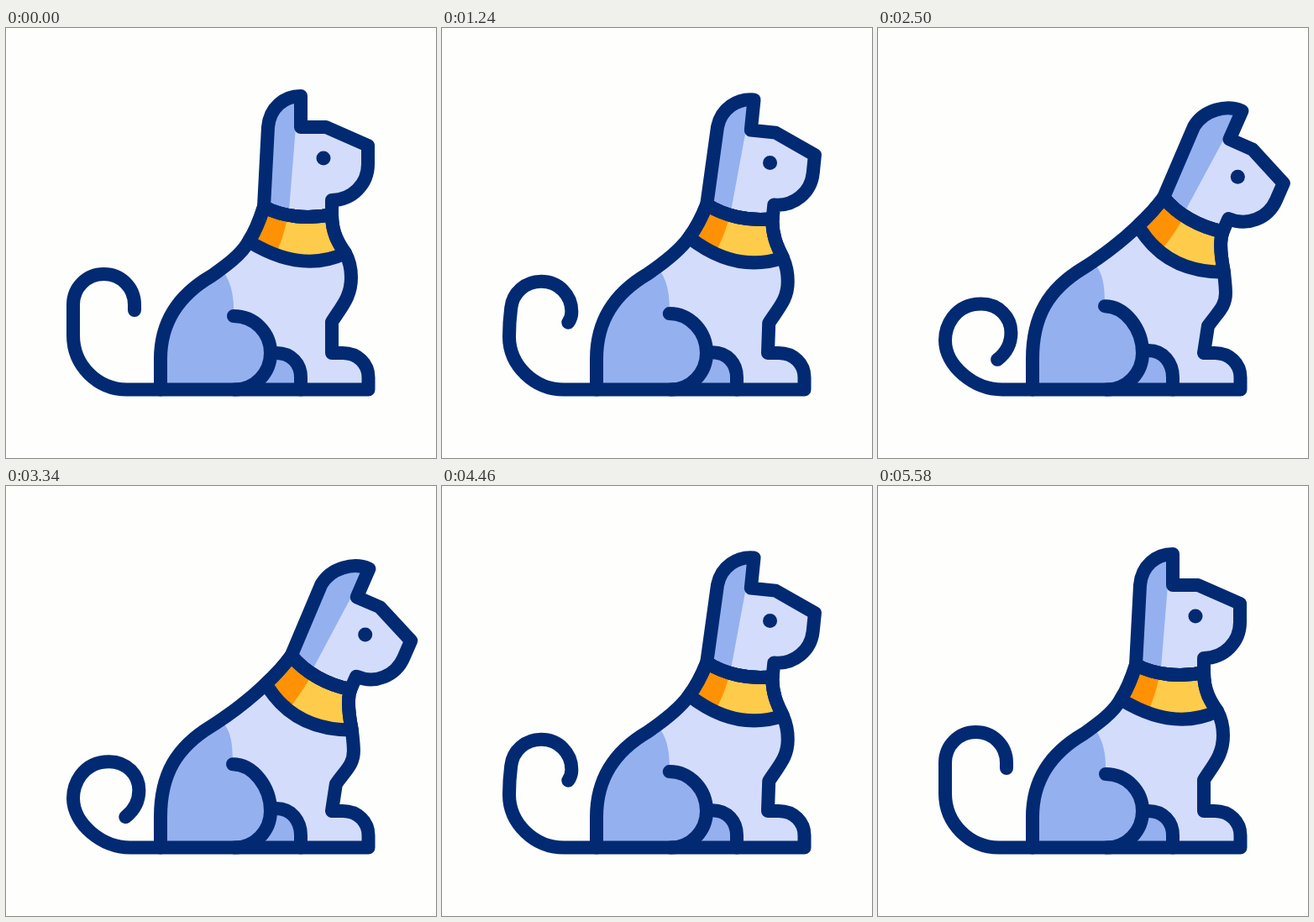
Animation of 512 by 512 pixels, one loop 5680 ms. Source, as an HTML page:

```html
<!DOCTYPE html>
<html lang="en">
<head>
<meta charset="utf-8">
<title>Sitting cat</title>
<style>
  html, body { margin: 0; width: 100%; height: 100%; overflow: hidden; background: #fefefc; }
  svg { display: block; width: 100%; height: 100%; }
  path { fill: none; stroke-width: 16; stroke-linecap: round; stroke-linejoin: round; }
</style>
</head>
<body>
<svg id="stage" viewBox="0 0 512 512"></svg>
<script>
const NAVY = '#022a72', LILAC = '#d3dcfb', BLUE = '#94b0ef', YELLOW = '#ffcb4a', ORANGE = '#ff9204';
const LOOP = 5680, TILT = 24 * Math.PI / 180;
const stage = document.getElementById('stage');

// Rigid head tilt: turns about the base of the ear and shifts it.
function tilt(path) {
  const c = Math.cos(TILT), s = Math.sin(TILT);
  return path.replace(/([\d.]+) ([\d.]+)/g, (_, px, py) => {
    const x = px - 351, y = py - 118;
    return (419.3 + x * c - y * s).toFixed(2) + ' ' + (132.7 + x * s + y * c).toFixed(2);
  });
}

// Each shape is a pair of poses: upright and leaning forward.
const back = [
  'M184 430.5 L184 394 C184 349 207 317 245 295',
  'M184 430.5 L184 394 C184 343 203 311 244 286'
];
const neck = [
  'C297 242 302 229 307 213',
  'C322 224 332 213 340.5 201.6'
];
const band = [
  'C330 225 360 228 388 222 C388 244 396 257 404 268',
  'C356.5 222 382.5 236.8 410.8 242.7 C407 252 408 270 412 291'
];
const body = [
  back[0] + ' C262 283 280 270 289 254 ' + neck[0] + band[0] +
  ' C409 277 411 288 411 297 C411 320 400 331 388 350 L388 387 L401 387 C419 387 431.5 400 431.5 416 L431.5 430.5 Z',
  back[1] + ' C268 271 291 253 310 235 ' + neck[1] + band[1] +
  ' C413 300 414 308 414 316 C414 332 405 338 393 355 L388 387 L401 387 C419 387 431.5 400 431.5 416 L431.5 430.5 Z'
];
const thigh = [
  'M271 343 C296 343 315 363 315 387 C315 411 296 430.5 272 430.5',
  'M270 331 C294 331 315 358 315 387 C315 411 296 430.5 272 430.5'
];
const haunch = [
  back[0] + ' L257 288 C268 301 272 320 ' + thigh[0].slice(1) + ' Z',
  back[1] + ' L256 279 C268 291 270 305 ' + thigh[1].slice(1) + ' Z'
];
const foot = [
  'M322 387 C340 387 351 400 351 416 L351 430.5 L300 430.5 L315 387 Z',
  'M322 384 C340 384 351 399 351 416 L351 430.5 L300 430.5 L315 387 Z'
];
const footLine = foot.map(d => d.split(' L300')[0]);
const collar = [
  'M289 254 ' + neck[0] + band[0] + ' Q352 293 289 254 Z',
  'M310 235 ' + neck[1] + band[1] + ' Q342 291 310 235 Z'
];
const clasp = [
  'M289 254 ' + neck[0] + ' L335 224 Q332 246 320 272 Z',
  'M310 235 ' + neck[1] + ' L364 226 Q354 244 335 268 Z'
];
const tail = [
  'M184 430.5 L144 430.5 C109 430.5 80 402 80 366 C80 354 80 342 80 329.5 C80 309 96 293 116.5 293 ' +
  'C137 293 153 309 153 329.5 C153 332 153 334 153 336',
  'M184 430.5 L148 430.5 C114 430.5 80 402 80 372 C80 362 83 353 89 345 C97 334.5 109 329 123 329 ' +
  'C144 329 158.5 345 158.5 363 C158.5 377 153 387 142 395.5'
];
// The back of the ear bends a little as the head tilts.
const headAt = ear => 'M307 213 L' + ear + ' 331 81 351 81 L351 118 L381 118 L431 140 L431 162 ' +
  'C431 186 412 205 388 205 L388 222 C360 228 330 225 307 213 Z';
const shadeAt = ear => 'M307 213 L' + ear + ' 331 81 351 81 L345 118 L336.5 223 Z';
const posed = shape => [shape('312 118 C314 95'), tilt(shape('306 121 C309 98'))];
const head = posed(headAt);
const headShade = posed(shadeAt);
const eye = ['M378 155 L378 155', tilt('M378 155 L378 155')];

const parts = [];
function add([from, to], fill, stroke, width) {
  const el = document.createElementNS('http://www.w3.org/2000/svg', 'path');
  if (fill) el.style.fill = fill;
  if (stroke) el.style.stroke = stroke;
  if (width) el.style.strokeWidth = width;
  stage.append(el);
  parts.push({ el, from, to: to.match(/[\d.]+/g).map(Number) });
}
add(body, LILAC);
add(foot, BLUE);
add(haunch, BLUE);
add(collar, YELLOW);
add(clasp, ORANGE);
add(head, LILAC);
add(headShade, BLUE);
for (const shape of [body, thigh, footLine, collar, tail, head]) add(shape, null, NAVY);
add(eye, null, NAVY, 17);

// Steps last 100, 20 and 20 ms in turn, after a first one of 20 ms.
function stepAt(t) {
  if (t < 20) return 0;
  const q = t - 20, r = q % 140;
  return Math.min(119, 1 + 3 * Math.floor(q / 140) + (r < 100 ? 0 : r < 120 ? 1 : 2));
}

// Cubic Bezier easing (.75, 0, .25, 1), solved by bisection.
function ease(x) {
  if (x <= 0) return 0;
  if (x >= 1) return 1;
  let lo = 0, hi = 1;
  for (let i = 0; i < 24; i++) {
    const s = (lo + hi) / 2, r = 1 - s;
    if (2.25 * r * r * s + 0.75 * r * s * s + s * s * s < x) lo = s; else hi = s;
  }
  return lo * lo * (3 - 2 * lo);
}

function draw(now) {
  const step = stepAt(now % LOOP);
  const lean = step < 60.5 ? ease((step - 1) / 59.5) : 1 - ease((step - 60.5) / 59.5);
  for (const { el, from, to } of parts) {
    let i = 0;
    el.setAttribute('d', from.replace(/[\d.]+/g, n => (+n + (to[i++] - n) * lean).toFixed(2)));
  }
}

const start = performance.now();
function loop() {
  draw(performance.now() - start);
  requestAnimationFrame(loop);
}
loop();
</script>
</body>
</html>
```
